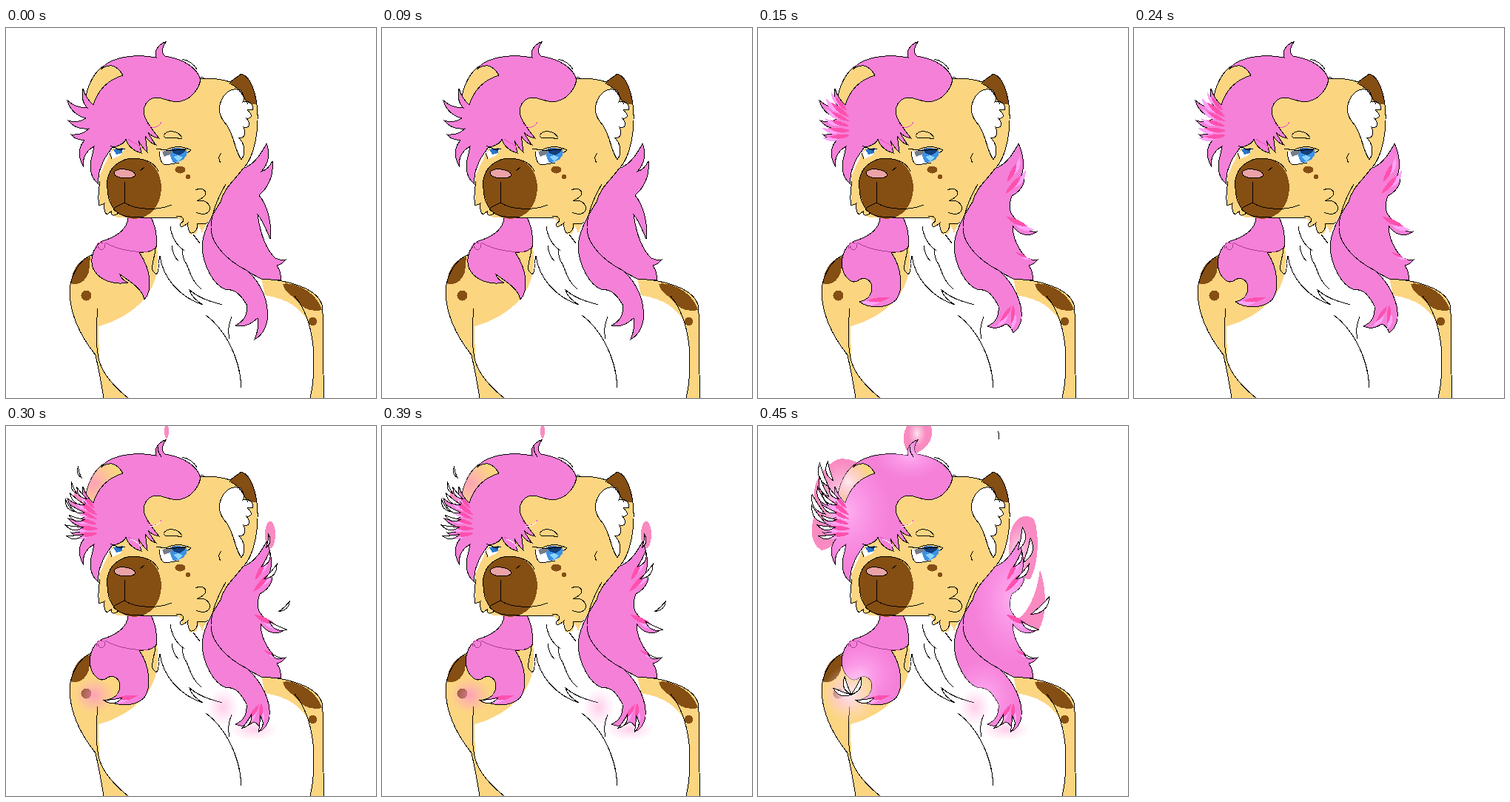
An HTML page that plays this animation: 500x500 px, repeating every 600 ms.

```html
<!DOCTYPE html>
<html lang="en">
<head>
<meta charset="utf-8">
<title>Flaming hair</title>
<style>
html, body { margin: 0; width: 100%; height: 100%; overflow: hidden; background: #fff; }
svg { display: block; width: 100vw; height: 100vh; shape-rendering: crispEdges; }
path, ellipse { stroke-width: 1; }
.ink { fill: none; stroke: #000; }
.tan { fill: #fcd581; }
.brown { fill: #854e13; }
.pink { fill: #f580d8; }
.white { fill: #fff; }
.hot { fill: #ff50ae; }
.light { fill: #ffa3fa; }
.rose { fill: #f98bc2; }
.line { stroke: #000; }
</style>
</head>
<body>
<svg viewBox="0 0 500 500">
  <defs>
    <radialGradient id="blush"><stop stop-color="#ff8ccf" stop-opacity=".7"/><stop offset="1" stop-color="#ff9ad8" stop-opacity="0"/></radialGradient>
    <radialGradient id="shine"><stop stop-color="#fff3f4" stop-opacity=".9"/><stop offset="1" stop-color="#ffd0e8" stop-opacity="0"/></radialGradient>
    <radialGradient id="sheen"><stop stop-color="#ffb4f4" stop-opacity=".9"/><stop offset="1" stop-color="#ff9cee" stop-opacity="0"/></radialGradient>
    <path id="ear" d="M107 104C107 82 120 52 141 48C150 50 157 55 160 65L122 108Z"/>
    <path id="mane" d="M217 18C210 26 210 34 215 38C238 42 258 52 263 70C260 84 250 96 236 99C222 102 214 94 203 94C190 95 184 108 187 118C190 128 198 138 207 149C200 148 196 146 192 141C196 149 200 155 203 158C196 156 191 151 188 146C190 155 190 163 191 168C184 162 181 156 179 152C181 160 182 165 183 169C172 166 165 160 162 150C160 157 150 160 143 162C138 170 132 176 130 184C126 192 124 200 125 211C116 204 112 192 115 178C117 170 118 166 119 160C108 166 104 176 104 186C97 174 98 160 106 152C98 151 91 149 88 144C100 145 108 140 112 136C100 137 90 133 84 125C94 128 102 126 108 122C94 118 86 110 83 98C92 106 100 108 110 108C104 102 102 92 104 82C108 94 112 98 118 104C124 84 138 70 158 64C150 50 140 47 128 56C140 40 172 34 203 40C200 30 206 22 217 18Z"/>
    <path id="side" d="M352 156C360 174 361 194 353 204L346 210C352 210 357 207 360 202C360 214 352 222 343 227C338 240 340 250 347 257C355 268 365 277 377 275C366 284 351 279 344 267C344 285 354 303 364 311C370 314 374 314 378 313C374 318 371 320 366 321C371 328 372 334 371 341L345 339C340 336 330 332 326 328C345 345 358 370 356 393C354 404 350 408 345 412C343 406 340 402 335 400C326 406 318 407 310 403C322 398 326 388 325 376C318 362 310 352 298 354C280 348 266 320 265 295C266 275 280 250 290 235C295 215 310 205 320 190C335 185 345 170 352 156Z"/>
    <path id="lock" d="M165 256C164 272 150 282 130 288C114 296 109 318 117 333C122 341 128 345 134 342C142 335 153 339 154 350C154 362 146 368 137 370C150 379 172 380 186 368C197 355 195 325 180 303C192 304 201 300 204 294C204 275 201 265 196 256Z"/>
    <clipPath id="inEar"><use href="#ear"/></clipPath>
    <clipPath id="inMane"><use href="#mane"/></clipPath>
    <clipPath id="inSide"><use href="#side"/></clipPath>
    <clipPath id="inLock"><use href="#lock"/></clipPath>
  </defs>

  <!-- arms and chest -->
  <path class="tan" d="M118 306C100 311 86 335 86 358C87 390 102 418 121 442C126 465 129 480 132 500H165C150 488 132 470 126 450L125 403C145 398 174 384 190 362C202 345 207 330 204 292L150 290Z"/>
  <path class="tan" d="M345 338C385 342 420 352 427 374C431 405 427 440 430 500H411C417 470 417 430 411 402C400 378 380 366 350 361Z"/>
  <path class="brown" d="M114 309C100 311 88 328 88 345C96 349 108 343 112 330Z"/>
  <ellipse class="brown" cx="108.500" cy="361.500" rx="7" ry="7"/>
  <path class="brown" d="M374 346C390 342 421 358 427 381C414 384 400 380 393 368C385 360 377 358 374 346Z"/>
  <ellipse class="brown" cx="414.500" cy="396.500" rx="6" ry="5.500"/>
  <path class="ink" d="M118 306C100 311 86 335 86 358C87 390 102 418 121 442C126 465 129 480 132 500M124 379C121 410 122 435 126 450C132 470 150 488 165 500M345 338C385 342 420 352 427 374C431 405 427 440 430 500M390 362C403 378 412 400 415 430C417 460 416 480 411 500"/>
  <path class="ink" d="M270 388C292 404 316 440 318 486M305 390C300 402 300 412 302 420"/>

  <!-- flame clouds behind the hair -->
  <g data-on="2" class="rose">
    <ellipse cx="97" cy="99" rx="6" ry="12"/>
    <ellipse cx="357" cy="147" rx="7" ry="18"/>
    <ellipse cx="217" cy="7" rx="3" ry="10"/>
  </g>
  <g data-on="3">
    <path class="rose" d="M108 45C84 56 68 84 80 110C70 132 69 160 86 168C105 165 125 140 130 110L150 58C135 48 120 42 108 45Z"/>
    <path class="rose" d="M201 0C194 14 196 30 205 37L216 36C232 27 238 14 234 0Z"/>
    <path class="rose" d="M340 150C343 126 360 115 373 126C381 146 379 188 368 207C357 208 350 195 338 190Z"/>
    <path class="rose" d="M345 262C362 262 378 225 381 194C391 222 390 260 379 276C365 284 350 276 345 266Z"/>
    <ellipse fill="url(#shine)" cx="215" cy="10" rx="12" ry="18"/>
    <ellipse fill="url(#shine)" cx="352" cy="172" rx="18" ry="40"/>
    <ellipse fill="url(#shine)" cx="114" cy="100" rx="34" ry="52"/>
  </g>
  <use class="tan line" href="#ear"/>
  <g clip-path="url(#inEar)">
    <ellipse data-on="23" fill="url(#blush)" cx="119" cy="78" rx="32" ry="34"/>
    <ellipse data-on="3" fill="url(#shine)" cx="122" cy="76" rx="30" ry="32"/>
  </g>

  <!-- neck tuft -->
  <path class="ink" d="M202 290C204 305 196 315 198 327C202 335 207 335 206 318L208 308C212 338 235 364 266 374C256 368 250 362 248 354C262 366 275 369 292 374M222 268C224 284 231 294 241 301M224 294C225 304 229 311 233 315M238 300C239 309 240 315 244 319C250 334 253 344 264 353M253 279L262 291"/>

  <!-- lower left lock -->
  <path data-on="0" class="pink line" d="M165 256C164 272 150 282 130 288C116 296 112 318 120 329C127 340 145 348 165 344C158 341 155 338 154 333C168 343 184 352 187 367C197 356 198 330 180 303C192 304 201 300 204 294C204 275 201 265 196 256Z"/>
  <use data-on="123" class="pink line" href="#lock"/>
  <g data-on="3" clip-path="url(#inLock)"><ellipse fill="url(#sheen)" cx="140" cy="335" rx="48" ry="43"/></g>
  <path fill="none" stroke="#a73f91" d="M122 298C122 287 132 289 134 294C132 302 126 301 124 294M134 290C148 298 170 303 194 303"/>

  <!-- head -->
  <path class="tan" d="M255 69C280 66 297 71 303 73L318 62C335 68 341 100 340 130C338 160 330 180 320 190C302 210 295 230 286 246C276 256 270 263 265 277C263 272 262 270 260 267L258 277L248 279C247 274 247 270 246 264L236 270C238 264 237 260 232 256H160C151 257 143 254 142 250L134 251L132 239L126 240V200L150 150L200 90Z"/>
  <path class="ink" d="M255 69C280 66 297 71 303 73M127 207C125 220 124 232 126 240L133 237C132 246 134 253 138 251L142 248C142 255 147 254 152 250M230 255C240 253 243 260 236 264C234 270 239 270 246 263C245 270 248 278 251 277C257 276 259 270 259 264C266 265 271 266 273 262M256 219C264 215 272 219 269 226C266 230 261 232 258 234C269 231 277 238 275 246C273 252 264 253 257 249M291 169C286 174 288 180 290 182M213 146C216 151 222 148 227 148L238 150M213 145C218 137 232 138 238 148"/>
  <path class="brown" d="M137 205C140 186 157 176 173 176C197 176 210 194 210 217C209 240 196 257 173 258C149 257 135 237 137 205Z"/>
  <path class="ink" d="M137 205C140 186 157 176 173 176C190 177 201 182 206 194M137 205C136 225 139 239 150 249C160 257 180 256 195 256H232M160 208V236C152 241 148 240 145 245L154 252M160 236C175 246 205 247 224 239M181 193L187 188"/>
  <path fill="#eaa3a6" class="line" d="M146 195C151 188 170 190 175 198C174 203 162 204 154 202C149 201 146 199 146 195Z"/>
  <ellipse class="brown" cx="235.500" cy="191.500" rx="7" ry="5"/>
  <ellipse class="brown" cx="246" cy="201" rx="3.500" ry="3"/>

  <!-- right eye -->
  <path class="white" d="M207 167C220 164 236 160 244 166C244 178 232 186 213 185C209 180 207 174 207 167Z"/>
  <path fill="#3d91e2" d="M222 164C231 160 241 162 245 168C244 176 237 182 226 182C222 176 221 170 222 164Z"/>
  <path fill="#123f7d" d="M224 163H243L241 168L234 172L226 169Z"/>
  <path fill="#8ad5ff" d="M226 174L233 172L239 175L233 180Z"/>
  <path fill="#777d87" d="M211 167L223 164V170L214 174Z"/>
  <path class="ink" d="M203 163L216 165C229 158 240 160 250 165L245 169M207 167C208 178 210 184 216 185L234 182M216 166L244 164"/>

  <!-- side hair -->
  <path data-on="0" class="pink line" d="M352 156C358 172 354 184 345 194C352 192 357 186 360 180C362 200 354 216 342 226C352 238 360 262 357 285C350 268 345 258 340 252C344 280 352 300 364 311C370 314 374 314 378 313C374 318 371 320 366 321C371 328 372 334 371 341L345 339C340 336 330 332 326 328C345 345 356 370 353 395C350 410 344 416 336 421C341 408 342 400 340 392C330 402 320 404 310 402C322 396 326 388 326 375C318 362 310 352 298 354C280 348 266 320 265 295C266 275 280 250 290 235C295 215 310 205 320 190C335 185 345 170 352 156Z"/>
  <use data-on="123" class="pink line" href="#side"/>
  <g data-on="3" clip-path="url(#inSide)">
    <ellipse fill="url(#sheen)" cx="345" cy="235" rx="55" ry="85"/>
    <ellipse fill="url(#sheen)" cx="305" cy="365" rx="48" ry="50"/>
  </g>
  <path class="ink" d="M297 211C286 230 278 248 277 268C276 292 300 315 326 328"/>

  <!-- right ear -->
  <path class="tan" d="M303 73L318 62C335 68 341 100 340 130C338 154 331 173 323 187L300 155L289 115Z"/>
  <path class="brown" d="M302 74L318 62C331 68 337 85 339 103L327 104L319 86Z"/>
  <path class="white line" d="M318 178C309 165 309 148 299 132C290 122 287 114 289 104C292 91 302 79 317 84C321 90 323 96 320 100C328 98 334 102 334 110L326 111C334 117 333 123 325 122C331 129 329 136 321 134C325 144 322 150 314 148C322 155 325 168 318 178Z"/>
  <path class="ink" d="M302 76L304 72L318 62C335 68 341 100 340 130C338 160 330 180 322 188M304 76C314 80 319 89 327 103"/>

  <!-- top hair -->
  <use class="pink line" href="#mane"/>
  <g data-on="3" clip-path="url(#inMane)">
    <ellipse fill="url(#sheen)" cx="120" cy="115" rx="60" ry="75"/>
    <ellipse fill="url(#sheen)" cx="205" cy="40" rx="48" ry="32"/>
  </g>
  <path fill="none" stroke="#f04fc9" d="M190 128C195 137 205 136 210 127M165 150C174 157 180 156 184 165"/>
  <path data-on="23" fill="none" stroke="#fff" stroke-width="2" d="M194 135C201 136 206 133 209 129M168 153C176 155 181 160 184 166"/>
  <path class="ink" d="M238 42C248 44 254 49 258 56M263 66L271 69"/>

  <!-- left eye -->
  <path class="white" d="M141 169L147 163H160L155 172L144 177Z"/>
  <path fill="#2877c9" d="M145 164L158 162L157 169L149 171Z"/>
  <path fill="#143b72" d="M147 163H158L156 167Z"/>
  <path class="ink" d="M141 159L150 163L161 164M140 169L143 177"/>

  <!-- flames, filled in by the script -->
  <path data-on="123" id="light" class="light"/>
  <path data-on="123" id="hot" class="hot"/>
  <g data-on="23" fill="url(#blush)">
    <ellipse cx="119" cy="364" rx="27" ry="24"/>
    <ellipse cx="293" cy="380" rx="22" ry="26" opacity=".6"/>
    <ellipse cx="335" cy="410" rx="33" ry="15" opacity=".6"/>
  </g>
  <ellipse data-on="3" fill="url(#shine)" cx="125" cy="362" rx="38" ry="40"/>
  <path data-on="23" id="tips" class="white line"/>
  <path data-on="2" id="sparks" class="white line"/>
  <path data-on="3" id="flames" class="white line"/>
  <path data-on="23" class="ink" d="M206 28C203 33 208 38 210 42"/>
  <path data-on="3" class="ink" d="M324 7C327 11 326 15 325 18"/>
</svg>
<script>
const STEP = 150, COUNT = 4;

// Rows of licks: roots run along a line while the heading turns (degrees).
const tufts = [
  { from: [114, 100], to: [113, 150], turn: [-125, -190], n: 6, size: 28, rise: 20 },
  { from: [341, 190], to: [343, 222], turn: [-70, -42], n: 2, size: 30, rise: 14 },
  { from: [347, 260], to: [347, 260], turn: [25, 25], n: 1, size: 30, rise: 20 },
  { from: [355, 306], to: [355, 306], turn: [25, 25], n: 1, size: 17, rise: 0 },
  { from: [332, 384], to: [348, 384], turn: [140, 80], n: 2, size: 25, rise: 0 },
  { from: [166, 366], to: [166, 366], turn: [172, 172], n: 1, size: 28, rise: 0 }
];

let seed = 7;
function random() {
  seed = seed * 16807 % 2147483647;
  return seed / 2147483647;
}
const mix = (a, b, k) => a + (b - a) * k;

// A curled flame growing from its root along the heading.
function lick(x, y, angle, len, width, curl = .25) {
  const dx = Math.cos(angle) * len, dy = Math.sin(angle) * len;
  const side = Math.cos(angle) < 0 ? -1 : 1;
  const edge = k => `${x + dx / 2 - dy * side * k} ${y + dy / 2 + dx * side * k}`;
  return `M${x} ${y}Q${edge(curl + width)} ${x + dx} ${y + dy}Q${edge(curl - width)} ${x} ${y}Z`;
}

const shapes = { light: '', hot: '', tips: '', sparks: '', flames: '' };
for (const { from, to, turn, n, size, rise } of tufts) {
  for (let i = 0; i < n; i++) {
    const k = (i + .5) / n;
    const x = mix(from[0], to[0], k), y = mix(from[1], to[1], k);
    const angle = mix(turn[0], turn[1], k) * Math.PI / 180;
    const len = size * mix(.9, 1.15, random());
    const along = d => [x + Math.cos(angle) * len * d, y + Math.sin(angle) * len * d];
    shapes.light += lick(...along(-.1), angle, len, .2);
    shapes.hot += lick(...along(-.4), angle, len, .2, .05);
    shapes.tips += lick(...along(.3), angle, len * .8, .2);
    if (!rise) continue;
    const up = mix(angle, -Math.PI / 2, .6 * Math.sign(Math.cos(angle) + 1));
    const [sx, sy] = along(.75);
    if (i % 2 === 0) shapes.sparks += lick(sx, sy - rise, up, len * .6, .16);
    shapes.flames += lick(sx, sy - rise * .8, up, len * 1.05, .2);
  }
}

// Small flames licking up inside the left lock.
for (const heading of [-160, -110, -60]) {
  shapes.flames += lick(126, 363, heading * Math.PI / 180, 26, .2);
}
for (const id in shapes) document.getElementById(id).setAttribute('d', shapes[id]);

const layers = [...document.querySelectorAll('[data-on]')];
let shown = -1;
function draw(now) {
  const pose = Math.floor(now / STEP) % COUNT;
  if (pose === shown) return;
  shown = pose;
  for (const layer of layers) {
    layer.style.display = layer.dataset.on.includes(pose) ? '' : 'none';
  }
}
const start = performance.now();
function tick() {
  draw(performance.now() - start);
  requestAnimationFrame(tick);
}
tick();
</script>
</body>
</html>
```
